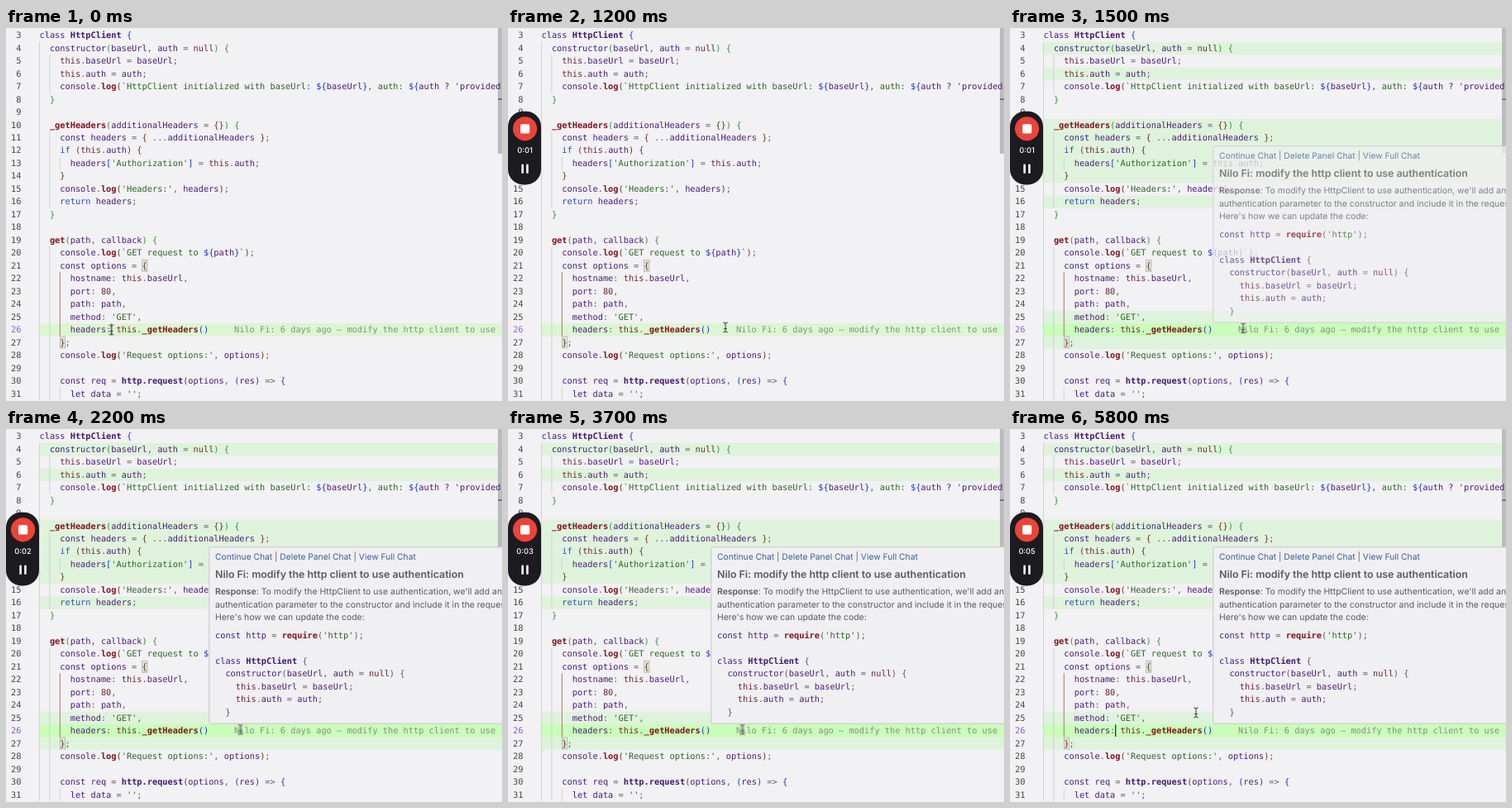
Write an HTML page that moves like this. It is 600x451 px and loops after 6000 ms.

```html
<!DOCTYPE html>
<html lang="en">
<head>
<meta charset="utf-8">
<title>Code hover</title>
<style>
html, body { margin: 0; width: 100%; height: 100%; overflow: hidden; background: #f2f1f4; }
svg { display: block; width: 600px; height: 451px; }
text { white-space: pre; text-rendering: geometricPrecision; fill: #5c5862; }
.mono { font: 10.3px "DejaVu Sans Mono", monospace; }
.sans { font: 10.45px Inter, sans-serif; }
.num { fill: #46473f; text-anchor: end; }
.num.on { fill: #8f5fd6; }
.type { fill: #3f1c82; }
.word { fill: #2f4db4; }
.lang { fill: #6c2636; }
.str { fill: #2c6426; }
.name { fill: #4a1c78; }
.fn { fill: #80141f; font-weight: bold; }
.cls { fill: #43196f; font-weight: bold; }
.b0 { fill: #1a34d8; }
.b1 { fill: #319331; }
.b2 { fill: #6c3318; }
.blame { fill: #868d85; }
.links { font-size: 10.25px; }
.link { fill: #3c5f99; }
.title { font-size: 12.4px; font-weight: 600; }
.strong { font-weight: 600; }
.time { font: 500 9.2px Inter, sans-serif; fill: #fff; text-anchor: middle; }

.lit, .panel, .caret, .beam, .recorder, .time { animation: 6s linear infinite; }
.lit { animation-name: lit; }
.panel { animation-name: panel; }
.recorder { animation-name: recorder; }
.beam { animation-name: beam; }
.caret { animation-name: blink; animation-timing-function: step-end; }
.time { animation-name: tick; animation-timing-function: step-end; }
@keyframes lit { 0%, 23% { opacity: 0 } 24.7%, 100% { opacity: 1 } }
@keyframes panel { 0%, 23.2% { opacity: 0 } 25% { opacity: .75 } 26.6%, 100% { opacity: 1 } }
@keyframes recorder { 0%, 1% { opacity: 0 } 5%, 100% { opacity: 1 } }
@keyframes beam {
  0%, 5% { transform: translate(127.5px, 365px); animation-timing-function: ease-in-out }
  19% { transform: translate(263px, 362px) }
  21% { transform: translate(263px, 362px); animation-timing-function: ease-out }
  24.5% { transform: translate(282px, 363px) }
  30%, 90% { transform: translate(283.5px, 363.5px); animation-timing-function: ease-in-out }
  96.5%, 100% { transform: translate(225px, 343px) }
}
@keyframes blink {
  0% { opacity: 1 } 2.5% { opacity: 0 }
  11.5% { opacity: 1 } 19.5% { opacity: 0 }
  28.5% { opacity: 1 } 36.5% { opacity: 0 }
  45.5% { opacity: 1 } 53.5% { opacity: 0 }
  62.5% { opacity: 1 } 71.5% { opacity: 0 }
  79.5% { opacity: 1 } 89.5% { opacity: 0 }
  96.5%, 100% { opacity: 1 }
}
@keyframes tick { 0% { opacity: 1 } 16.667%, 100% { opacity: 0 } }
</style>
</head>
<body>
<svg viewBox="0 0 600 451">
  <defs>
    <path id="ibeam" d="M-2.4-6Q0-6 0-4.4Q0-6 2.4-6M0-4.4V4.4M-2.4 6Q0 6 0 4.4Q0 6 2.4 6M-1.4 1.6H1.4"/>
  </defs>
  <g id="bands"></g>
  <g id="guides" fill="none" stroke="#d2d1d5"></g>
  <g fill="#dce3d8" stroke="#b3b6b0" stroke-width=".8">
    <rect x="164.6" y="280.3" width="6.4" height="14"/>
    <rect x="65.3" y="373" width="6.4" height="14"/>
  </g>
  <rect x="595" y="0" width="5" height="152" fill="#bcbbbf"/>
  <rect x="595" y="85.5" width="5" height="1.3" fill="#55545a"/>
  <g id="code" class="mono"></g>
  <rect class="caret" x="127" y="357.5" width="1.3" height="14.5" fill="#33283d"/>
  <g class="panel">
    <rect x="245.8" y="142.8" width="360" height="213.4" rx="1.5" fill="#f0eff1" stroke="#c6c5ca"/>
    <g id="panel"></g>
  </g>
  <g class="recorder">
    <rect x="0" y="100.7" width="40" height="88.8" rx="18.5" fill="#1c1b1f"/>
    <circle cx="20.5" cy="121.8" r="14.6" fill="#eb4438"/>
    <rect x="15" y="116.3" width="11.2" height="11.2" rx="1.6" fill="#fff"/>
    <path d="M17.6 165.8v9M23.4 165.8v9" stroke="#fff" stroke-width="2.6" stroke-linecap="round"/>
    <g id="clock"></g>
  </g>
  <g class="beam" fill="none" stroke-linecap="round">
    <use href="#ibeam" stroke="#fff" stroke-width="1.9" opacity=".6"/>
    <use href="#ibeam" stroke="#28242c" stroke-width=".95"/>
  </g>
</svg>
<script>
const FIRST = 3, PITCH = 15.475, LEFT = 40.5, ADVANCE = 6.2;
const AUTHOR = 'Nilo Fi';
const SUBJECT = 'modify the http client to use';

const source = `class HttpClient {
  constructor(baseUrl, auth = null) {
    this.baseUrl = baseUrl;
    this.auth = auth;
    console.log(\`HttpClient initialized with baseUrl: \${baseUrl}, auth: \${auth ? 'provided' : 'none'}\`);
  }

  _getHeaders(additionalHeaders = {}) {
    const headers = { ...additionalHeaders };
    if (this.auth) {
      headers['Authorization'] = this.auth;
    }
    console.log('Headers:', headers);
    return headers;
  }

  get(path, callback) {
    console.log(\`GET request to \${path}\`);
    const options = {
      hostname: this.baseUrl,
      port: 80,
      path: path,
      method: 'GET',
      headers: this._getHeaders()
    };
    console.log('Request options:', options);

    const req = http.request(options, (res) => {
      let data = '';`.split('\n');

const snippet = [
  "const http = require('http');", '',
  'class HttpClient {',
  '  constructor(baseUrl, auth = null) {',
  '    this.baseUrl = baseUrl;',
  '    this.auth = auth;',
  '  }'
];

const $ = id => document.getElementById(id);
const add = (id, markup) => $(id).insertAdjacentHTML('beforeend', markup);
const span = (cls, s) => `<tspan class="${cls}">${s}</tspan>`;
const text = (x, y, s, cls = '') => `<text x="${x}" y="${y}" class="${cls}">${s}</text>`;
const rowTop = n => 1.3 + (n - FIRST) * PITCH;
const baseline = n => 12.2 + (n - FIRST) * PITCH;

// Returns a line highlighter that remembers bracket depth between lines.
function highlighter(colourBrackets) {
  const token = /(?<str>`[^`]*`|'[^']*')|(?<type>\b(?:const|class|let|constructor)\b)|(?<word>\b(?:if|return)\b)|(?<lang>\b(?:this|null|\d+)\b)|(?<cls>HttpClient|http\.request)|(?<fn>\w+(?=\())|(?<bracket>[()[\]{}])|(?<name>\w+)/g;
  let depth = 0;
  const bracket = s => {
    if (!colourBrackets) return s;
    const level = '([{'.includes(s) ? depth++ : --depth;
    return span('b' + level % 3, s);
  };
  const string = s => s.split(/(\$\{[^}]*\})/).map(part =>
    part.startsWith('${')
      ? span('b0', '${') + span('name', part.slice(2, -1)) + span('b0', '}')
      : span('str', part)).join('');
  return line => line.replace(token, (s, ...rest) => {
    const groups = rest.pop();
    const kind = Object.keys(groups).find(k => groups[k] !== undefined);
    if (kind === 'bracket') return bracket(s);
    return kind === 'str' ? string(s) : span(kind, s);
  });
}

const band = (n, fill, cls = '') =>
  `<rect class="${cls}" x="40" y="${rowTop(n)}" width="560" height="${PITCH}" fill="${fill}"/>`;
add('bands', band(26, '#dbf6d0'));
for (const n of [4, 6, 10, 11, 12, 13, 14, 16, 25, 27]) add('bands', band(n, '#dff3dc', 'lit'));
add('bands', band(26, '#c9fdb9', 'lit'));

const guide = (col, from, to, extra = '') => {
  const x = LEFT + col * ADVANCE;
  return `<path d="M${x} ${rowTop(from)}V${rowTop(to + 1)}" ${extra}/>`;
};
for (const [col, from, to] of [[0, 4, 31], [2, 5, 7], [2, 11, 16], [2, 20, 31], [4, 13, 13], [4, 31, 31]])
  add('guides', guide(col, from, to));
add('guides', guide(4, 22, 26, 'stroke="#a17c70"'));

const paint = highlighter(true);
source.forEach((line, i) => {
  const n = FIRST + i;
  add('code', text(18.4, baseline(n), n, n === 26 ? 'num on' : 'num') + text(LEFT, baseline(n), paint(line)));
});
add('code', text(276, baseline(26), `${AUTHOR}: 6 days ago – ${SUBJECT}`, 'blame'));

const links = ['Continue Chat', 'Delete Panel Chat', 'View Full Chat'].map(s => span('link', s)).join(' | ');
add('panel',
  text(253, 157.6, links, 'sans links') +
  text(253, 179.6, `${AUTHOR}: ${SUBJECT} authentication`, 'sans title') +
  text(253, 200.4, span('strong', 'Response') + ": To modify the HttpClient to use authentication, we'll add an", 'sans') +
  text(253, 215.7, 'authentication parameter to the constructor and include it in the request.', 'sans') +
  text(253, 231, "Here's how we can update the code:", 'sans'));
const plain = highlighter(false);
snippet.forEach((line, i) => add('panel', text(253, 253 + i * 15.42, plain(line), 'mono')));

for (let s = 0; s < 6; s++)
  add('clock', `<text class="time" x="20.5" y="151.3" style="animation-delay:${s - 6}s">0:0${s}</text>`);
</script>
</body>
</html>
```
